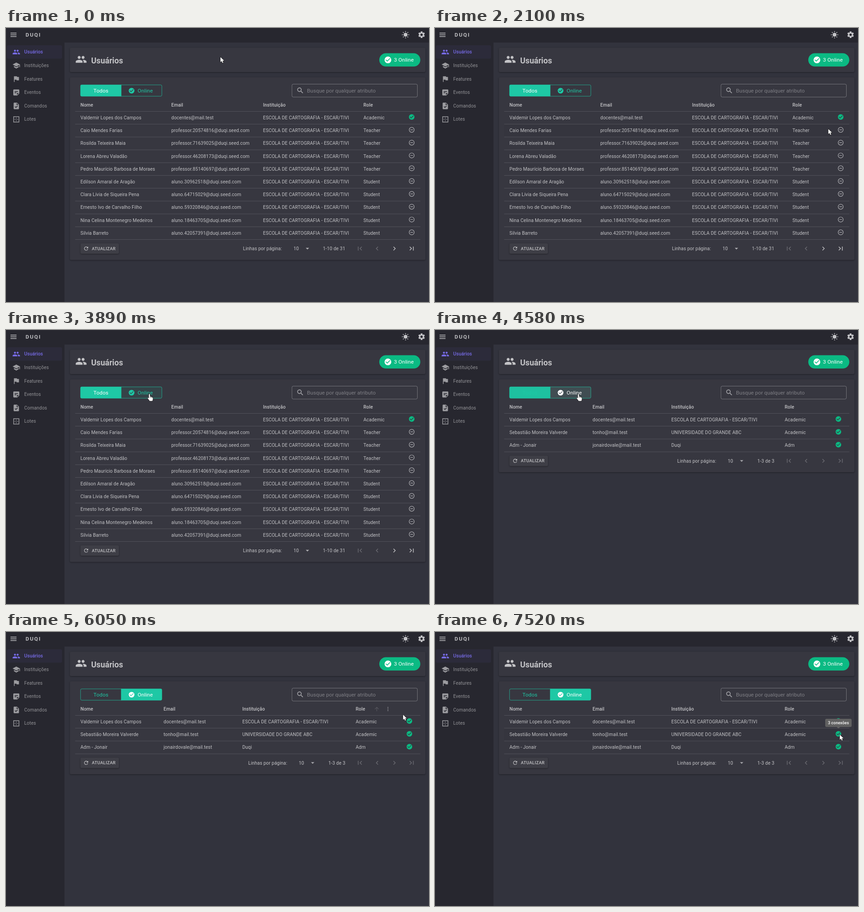
Animation of 929 by 603 pixels, one loop 8000 ms. Source, as an HTML page with a canvas:

```html
<!DOCTYPE html>
<html lang="pt-BR">
<head>
<meta charset="utf-8">
<title>Usuários</title>
<style>
html, body { margin: 0; width: 100%; height: 100%; overflow: hidden; background: #32333d; }
canvas { display: block; width: 929px; height: 603px; }
</style>
</head>
<body>
<canvas id="stage"></canvas>
<script>
const W = 929, H = 603, LOOP = 8000, CLICK = 4500;
const canvas = document.getElementById('stage');
const ctx = canvas.getContext('2d');
const dpr = window.devicePixelRatio || 1;
canvas.width = W * dpr;
canvas.height = H * dpr;

const white = a => `rgba(255,255,255,${a})`;
const TEXT = white(0.7), MUTED = white(0.5), DISABLED = white(0.26), LINE = white(0.19);
const BAR = '#27272f', BACK = '#32333d', SURFACE = '#373740';
const TEAL = '#1ec8a5', GREEN = '#0bba83', PURPLE = '#776be7', ACTION = '#adadb1';
const HAIR = 0.73; // one CSS pixel at the interface scale

// Icons on a 24 x 24 grid
const icons = {
  people: 'M16 11c1.66 0 3-1.34 3-3s-1.34-3-3-3-3 1.34-3 3 1.34 3 3 3zM8 11c1.66 0 3-1.34 3-3S9.66 5 8 5 5 6.34 5 8s1.34 3 3 3zm0 2c-2.33 0-7 1.17-7 3.5V19h14v-2.5c0-2.33-4.67-3.5-7-3.5zm8 0c-.3 0-.6 0-1 .05 1.2.84 2 1.97 2 3.45V19h6v-2.5c0-2.33-4.67-3.5-7-3.5z',
  school: 'M5 13.2v4l7 3.8 7-3.8v-4L12 17zM12 3L1 9l11 6 9-4.9V17h2V9z',
  flag: 'M14.4 6L14 4H5v17h2v-7h5.6l.4 2h7V6z',
  note: 'M19 3H5c-1.1 0-2 .9-2 2v14c0 1.1.9 2 2 2h10l6-6V5c0-1.1-.9-2-2-2zM7 8h10v2H7zm5 6H7v-2h5zm2 5.5V14h5.5z',
  task: 'M14 2H6c-1.1 0-2 .9-2 2v16c0 1.1.9 2 2 2h12c1.1 0 2-.9 2-2V8zm-3 16l-3.6-3.5 1.4-1.4 2.2 2 4.2-4.2 1.4 1.4zM13 9V3.5L18.5 9z',
  grid: 'M3 3v18h18V3zm16 16H5V5h14zM11 7h2v2h-2zM11 11h2v2h-2zM15 11h2v2h-2zM11 15h2v2h-2zM7 11h2v2H7z',
  menu: 'M3 18h18v-2H3zM3 13h18v-2H3zM3 6v2h18V6z',
  check: 'M12 2a10 10 0 1 0 0 20 10 10 0 0 0 0-20zm-2 15l-5-5 1.4-1.4 3.6 3.6 7.6-7.6L19 8z',
  off: 'M7 11v2h10v-2zM12 2a10 10 0 1 0 0 20 10 10 0 0 0 0-20zm0 18a8 8 0 1 1 0-16 8 8 0 0 1 0 16z',
  search: 'M15.5 14h-.8l-.3-.3A6.5 6.5 0 1 0 13.7 14.4l.3.3v.8l5 5 1.5-1.5zm-6 0a4.5 4.5 0 1 1 0-9 4.5 4.5 0 0 1 0 9z',
  refresh: 'M17.65 6.35A8 8 0 1 0 19.73 14h-2.08A6 6 0 1 1 16.2 7.8L13 11h7V4z',
  first: 'M18.4 16.6L13.8 12l4.6-4.6L17 6l-6 6 6 6zM6 6h2v12H6z',
  prev: 'M15.4 7.4L14 6l-6 6 6 6 1.4-1.4-4.6-4.6z',
  next: 'M10 6L8.6 7.4l4.6 4.6-4.6 4.6L10 18l6-6z',
  last: 'M5.6 7.4l4.6 4.6-4.6 4.6L7 18l6-6-6-6zM16 6h2v12h-2z',
  drop: 'M7 10l5 5 5-5z',
  up: 'M4 12l1.4 1.4L11 7.8V20h2V7.8l5.6 5.6L20 12l-8-8z',
  dots: 'M12 4a2 2 0 1 0 0 4 2 2 0 0 0 0-4zM12 10a2 2 0 1 0 0 4 2 2 0 0 0 0-4zM12 16a2 2 0 1 0 0 4 2 2 0 0 0 0-4z'
};
for (const k in icons) icons[k] = new Path2D(icons[k]);

const ARROW = new Path2D('M0 0V11.2L2.6 8.8 4.3 12.8 6.3 12 4.6 8.1H8.1Z');
const HAND = new Path2D('M2.3 1.4Q2.3 0 3.5 0 4.7 0 4.7 1.4V5.5Q7 5.2 7.2 6 9.2 5.8 9.4 6.9 11 6.9 11 8.6V11.5Q11 13 9.8 15.2H4Q2.4 12.5 .3 10.2-.9 8.4.3 8 1.2 7.8 2.3 9.3Z');

const school = 'ESCOLA DE CARTOGRAFIA - ESCAR/TIVI';
const user = (name, mail, place, role, online) => ({ name, mail, place, role, online });
const teacher = (name, id) => user(name, `professor.${id}@duqi.seed.com`, school, 'Teacher');
const student = (name, id) => user(name, `aluno.${id}@duqi.seed.com`, school, 'Student');
const head = user('Valdemir Lopes dos Campos', 'docentes@mail.test', school, 'Academic', true);

const everyone = {
  cols: [163.5, 363, 564.5, 785], iconX: 891, pager: 520.5, range: '1-10 de 31', rangeX: 696, more: true,
  rows: [
    head,
    teacher('Caio Mendes Farias', '20574816'),
    teacher('Rosilda Teixeira Maia', '71639025'),
    teacher('Lorena Abreu Valadão', '46208173'),
    teacher('Pedro Maurício Barbosa de Moraes', '85140697'),
    student('Edilson Amaral de Aragão', '30962518'),
    student('Clara Lívia de Siqueira Pena', '64715029'),
    student('Ernesto Ivo de Carvalho Filho', '59320846'),
    student('Nina Celina Montenegro Medeiros', '18463705'),
    student('Silvia Barreto', '42057391')
  ]
};
const online = {
  cols: [163.5, 346, 519, 768], iconX: 886, pager: 532, range: '1-3 de 3', rangeX: 708, more: false,
  rows: [
    head,
    user('Sebastião Moreira Valverde', 'tonho@mail.test', 'UNIVERSIDADE DO GRANDE ABC', 'Academic', true),
    user('Adm - Jonair', 'jonairdovale@mail.test', 'Duqi', 'Adm', true)
  ]
};
const HEADS = ['Nome', 'Email', 'Instituição', 'Role'];
const TOP = 183.5, PITCH = 28.2;

// Pointer path: time, x, y, ease-out power of the leg that ends here
const path = [
  [210, 471, 64, 1], [1000, 894, 179, 2], [1030, 894, 179, 1], [1190, 887, 183, 1], [1490, 886, 196, 2],
  [1940, 886, 196, 1], [2100, 864, 222, 1], [2730, 810, 286, 2], [3140, 810, 286, 1], [3300, 584, 218, 1],
  [3890, 313, 141, 2], [5380, 313, 141, 1], [6050, 872, 182, 2], [6170, 884, 193, 1], [6400, 884, 194, 1],
  [6960, 884, 194, 1], [7520, 889, 226, 2]
];
// Tooltips: row, label, start, end
const tips = [
  [0, '2 conexões', 1260, 1980],
  [0, '2 conexões', 6170, 7010],
  [1, '3 conexões', 7270, LOOP]
];

const clamp = v => Math.max(0, Math.min(1, v));
const smooth = v => v * v * (3 - 2 * v);
const overOnline = (x, y) => x > 253 && x < 342 && y > 125 && y < 151;

function pointer(t) {
  let a = path[0];
  for (const b of path) {
    if (t < b[0]) {
      if (a === b) break;
      const p = 1 - (1 - (t - a[0]) / (b[0] - a[0])) ** b[3];
      return [a[1] + (b[1] - a[1]) * p, a[2] + (b[2] - a[2]) * p];
    }
    a = b;
  }
  return [a[1], a[2]];
}

function text(s, x, cy, color = TEXT, size = 10.25, weight = 400, spacing = 0.11, align = 'left') {
  ctx.font = `${weight} ${size}px Roboto, sans-serif`;
  ctx.letterSpacing = spacing + 'px';
  ctx.textAlign = align;
  ctx.fillStyle = color;
  ctx.fillText(s, x, cy + size * 0.355);
}

function icon(name, cx, cy, color, size = 17.6) {
  ctx.save();
  ctx.translate(cx - size / 2, cy - size / 2);
  ctx.scale(size / 24, size / 24);
  ctx.fillStyle = color;
  ctx.fill(icons[name], 'evenodd');
  ctx.restore();
}

function box(x, y, w, h, r, fill, stroke, line = 1) {
  ctx.beginPath();
  ctx.roundRect(x, y, w, h, r);
  if (fill) { ctx.fillStyle = fill; ctx.fill(); }
  if (stroke) { ctx.strokeStyle = stroke; ctx.lineWidth = line; ctx.stroke(); }
}

function raised(...args) {
  ctx.save();
  ctx.shadowColor = 'rgba(0,0,0,.4)';
  ctx.shadowBlur = 3 * dpr;
  ctx.shadowOffsetY = dpr;
  box(...args);
  ctx.restore();
}

function spokes(cx, cy, n, draw) {
  for (let i = 0; i < n; i++) {
    ctx.save();
    ctx.translate(cx, cy);
    ctx.rotate(i * 2 * Math.PI / n);
    draw();
    ctx.restore();
  }
}

function disc(x, y, r, color) {
  ctx.beginPath();
  ctx.arc(x, y, r, 0, 2 * Math.PI);
  ctx.fillStyle = color;
  ctx.fill();
}

function frameUi() {
  ctx.fillStyle = BACK;
  ctx.fillRect(0, 0, W, H);
  ctx.fillStyle = BAR;
  ctx.fillRect(0, 0, W, 32);
  ctx.fillRect(0, 32, 128.4, H);

  icon('menu', 16.5, 15, TEXT);
  text('DUQI', 43, 15, TEXT, 11.7, 700, 1.9);
  ctx.fillStyle = '#c4c4c7';
  spokes(877.5, 14.8, 8, () => ctx.fillRect(-0.75, -8, 1.5, 2.2));
  disc(877.5, 14.8, 4.3, '#c4c4c7');
  spokes(912.7, 14.8, 6, () => box(-2, -7.2, 4, 4, 0.7, '#c4c4c7'));
  disc(912.7, 14.8, 5.4, '#c4c4c7');
  disc(912.7, 14.8, 2.6, BAR);

  box(2, 38, 121, 29.5, 3, 'rgba(119,107,231,.06)');
  [['people', 'Usuários'], ['school', 'Instituições'], ['flag', 'Features'],
   ['note', 'Eventos'], ['task', 'Comandos'], ['grid', 'Lotes']].forEach(([ic, label], i) => {
    const y = 52.6 + i * 29.65;
    icon(ic, 22.6, y + 0.3, i ? '#9b9b9f' : PURPLE);
    text(label, 40, y, i ? MUTED : PURPLE, 10.2, i ? 400 : 500);
  });

  raised(140.2, 43.5, 781.1, 53.4, 3, SURFACE);
  icon('people', 165, 69, TEXT, 25.8);
  text('Usuários', 187, 71.5, TEXT, 17.6, 700, 0);
  box(819.8, 55.5, 90.1, 29.3, 14.65, GREEN);
  icon('check', 838.8, 70.2, '#fff', 17.8);
  text('3 Online', 852, 70.3, '#fff', 11.8);
}

function toggle(t, x, y) {
  const done = t >= CLICK;
  const p = smooth(clamp((t - CLICK - 50) / 250));
  const left = 163.4, top = 124.8, w = 179.2, h = 25.7, mid = left + w / 2;
  ctx.save();
  ctx.beginPath();
  ctx.roundRect(left, top, w, h, 3);
  ctx.clip();
  const fill = (fx, color, a) => {
    ctx.globalAlpha = a;
    ctx.fillStyle = color;
    ctx.fillRect(fx, top, w / 2, h);
  };
  fill(left, TEAL, 1 - p);
  fill(mid, TEAL, Math.max(p, overOnline(x, y) ? 0.08 : 0));
  if (done) fill(mid, '#fff', 0.06 * (1 - clamp((t - CLICK) / 760)));
  ctx.restore();
  box(left + HAIR / 2, top + HAIR / 2, w - HAIR, h - HAIR, 2.7, null, TEAL, HAIR);
  ctx.fillStyle = TEAL;
  ctx.fillRect(mid - HAIR / 2, top, HAIR, h);
  text('Todos', 192, 138.2, done ? TEAL : '#fff', 11.7);
  const c = done ? '#fff' : TEAL;
  icon('check', 275.8, 138, c, 15);
  text('Online', 289, 138.2, c, 11.7);
}

// Share of the last moments the pointer spent in a header cell
function hoverShare(t, x0, x1) {
  let hits = 0;
  for (let i = 0; i < 10; i++) {
    const [x, y] = pointer(t - i * 25);
    if (x > x0 && x < x1 && y > 155 && y < TOP) hits++;
  }
  return hits / 10;
}

function table(tb, t, px, py) {
  HEADS.forEach((label, i) => {
    const x = tb.cols[i];
    text(label, x, 169.5, TEXT, 10.25, 500);
    const end = x + ctx.measureText(label).width;
    const share = hoverShare(t, x - 11, i < 3 ? tb.cols[i + 1] - 11 : tb.iconX - 24);
    if (share) {
      icon('up', end + 25.5, 169.5, white(0.27 * share), 14);
      icon('dots', end + 50, 169.5, white(0.6 * share), 14);
    }
  });
  const strip = (y, h, color) => { ctx.fillStyle = color; ctx.fillRect(152, y, 758, h); };
  const rule = y => strip(y - HAIR / 2, HAIR, LINE);
  const hovered = px > 152 && px < 910 ? Math.floor((py - TOP) / PITCH) : -1;
  rule(TOP);
  tb.rows.forEach((r, i) => {
    const y = TOP + 13.8 + i * PITCH;
    if (i === hovered) strip(TOP + i * PITCH, PITCH, 'rgba(0,0,0,.04)');
    [r.name, r.mail, r.place, r.role].forEach((s, c) => text(s, tb.cols[c], y));
    icon(r.online ? 'check' : 'off', tb.iconX, y - 1.4, r.online ? GREEN : ACTION, 14.7);
    rule(TOP + (i + 1) * PITCH);
  });

  const y = TOP + tb.rows.length * PITCH + 19.8;
  raised(163.5, y - 11.3, 84.5, 22.8, 3, '#3e3e46');
  icon('refresh', 176, y, TEXT, 13.2);
  text('ATUALIZAR', 188.5, y, TEXT, 9.53, 500, 0.27);
  text('Linhas por página:', tb.pager, y);
  text('10', tb.pager + 111, y);
  icon('drop', tb.pager + 141.5, y, ACTION);
  text(tb.range, tb.rangeX, y);
  ['first', 'prev', 'next', 'last'].forEach((n, i) =>
    icon(n, 777.2 + i * 37.9, y, tb.more && i > 1 ? TEXT : DISABLED));
}

function tooltip(tb, t) {
  for (const [row, label, from, to] of tips) {
    if (t < from || t >= to) continue;
    const x = tb.iconX, y = 171.7 + row * PITCH;
    ctx.save();
    ctx.globalAlpha = smooth(clamp((t - from) / 230));
    box(x - 29, y - 9, 58, 18, 3, '#616161');
    ctx.beginPath();
    ctx.moveTo(x - 3.5, y + 9);
    ctx.lineTo(x, y + 12.5);
    ctx.lineTo(x + 3.5, y + 9);
    ctx.fill();
    text(label, x, y, '#fff', 8.8, 500, 0.12, 'center');
    ctx.restore();
  }
}

function cursor(x, y) {
  const hand = overOnline(x, y);
  ctx.save();
  ctx.translate(hand ? x - 1.5 : x, y);
  ctx.lineJoin = 'round';
  ctx.lineWidth = 1.2;
  ctx.strokeStyle = '#111';
  ctx.fillStyle = '#fff';
  ctx.stroke(hand ? HAND : ARROW);
  ctx.fill(hand ? HAND : ARROW);
  if (hand) {
    ctx.lineWidth = 0.6;
    ctx.beginPath();
    for (const lx of [4.7, 7, 9.2]) {
      ctx.moveTo(lx, 6);
      ctx.lineTo(lx, 8.4);
    }
    ctx.stroke();
  }
  ctx.restore();
}

function draw(now) {
  const t = now % LOOP;
  const tb = t < CLICK ? everyone : online;
  const [x, y] = pointer(t);
  ctx.setTransform(dpr, 0, 0, dpr, 0, 0);
  frameUi();
  raised(140.2, 108.5, 781.1, TOP + tb.rows.length * PITCH - 63.5, 3, SURFACE);
  toggle(t, x, y);
  box(628, 123.5, 275.5, 28.5, 3, null, white(0.3));
  icon('search', 646.3, 137.6, ACTION);
  text('Busque por qualquer atributo', 661, 138.2, white(0.36), 11.7, 400, 0);
  table(tb, t, x, y);
  tooltip(tb, t);
  cursor(x, y);
  requestAnimationFrame(draw);
}
requestAnimationFrame(draw);
</script>
</body>
</html>
```
